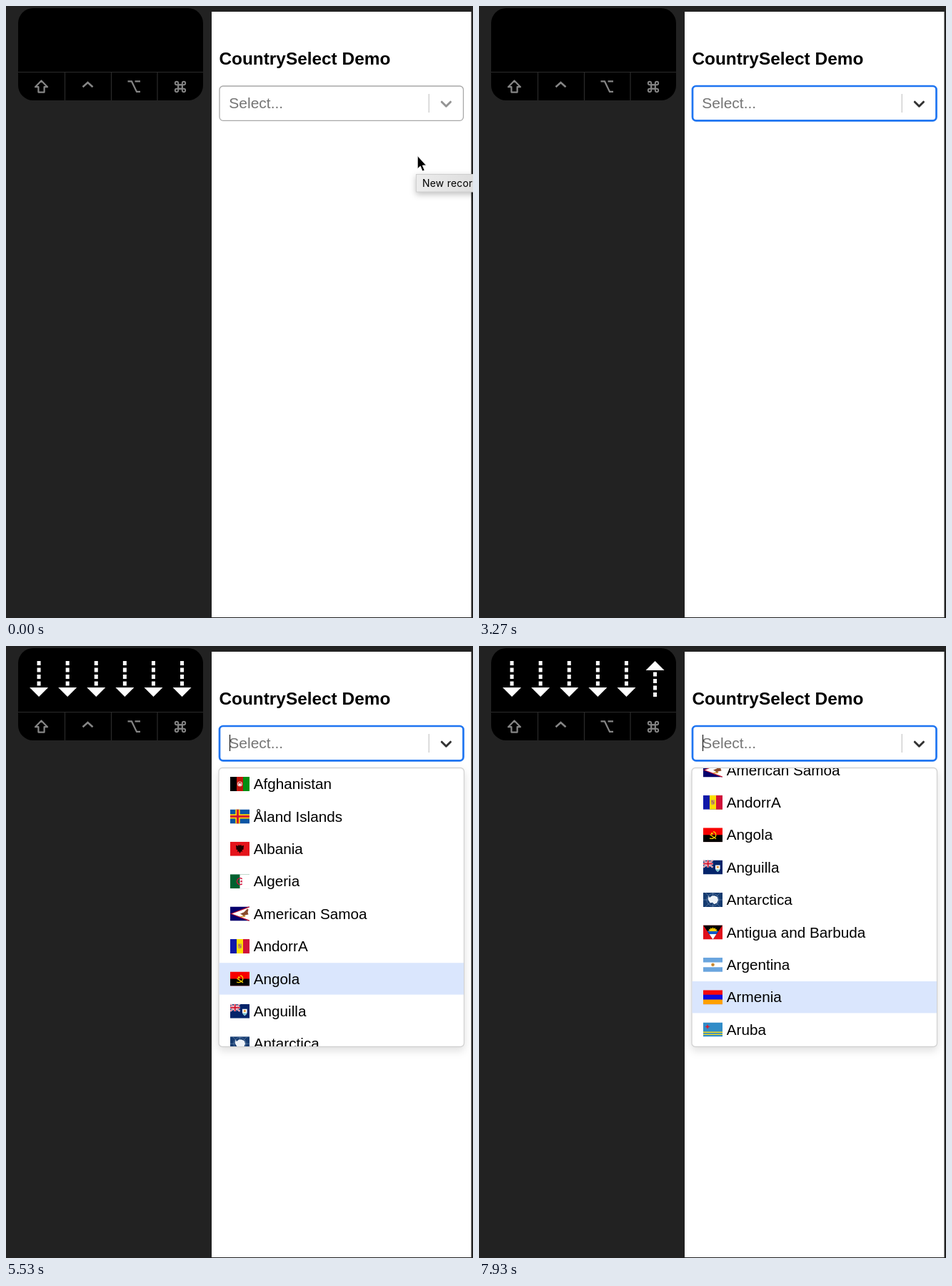
Recreate the animation shown at these times as an HTML page. Size 654 by 856 pixels, loop 8 s.

```html
<!DOCTYPE html>
<html lang="en">
<head>
<meta charset="utf-8">
<title>CountrySelect Demo</title>
<style>
  html, body { margin: 0; width: 100%; height: 100%; overflow: hidden; background: #222; }
  svg { display: block; }
  text { font: 20.7px "Liberation Sans", Arial, sans-serif; white-space: pre; }
  #title { font-size: 24.4px; font-weight: bold; }
  #hint { font-size: 21px; fill: #757575; }
  #tip text { font: 14px Inter, sans-serif; letter-spacing: .2px; }
  #menu > .card { fill: #fff; stroke: #d2d2d2; stroke-width: 1.3; filter: drop-shadow(0 5px 6px rgba(0,0,0,.12)); }
  .icon { fill: none; stroke: #858585; stroke-width: 2.2; }
  .rule { fill: none; stroke: #2b2b2b; stroke-width: 1.2; }
</style>
</head>
<body>
<svg width="654" height="856" viewBox="0 0 654 856">
  <defs>
    <clipPath id="page"><rect x="288" y="8" width="363.5" height="847"/></clipPath>
    <clipPath id="list"><rect x="298.5" y="171" width="342.5" height="389" rx="4.5"/></clipPath>
    <clipPath id="flag"><rect width="27" height="20"/></clipPath>
    <linearGradient id="tipFill"><stop stop-color="#ececec"/><stop offset="1" stop-color="#d9d9d9"/></linearGradient>
    <path id="loop" d="M-2.8 2.8V-5A2.2 2.2 0 1 0-5-2.8H2.8"/>
    <path id="key" fill="#fff" d="M-2.5-25h5v6h-5zM-2.5-15.5h5v6h-5zM-2.5-6h5v6h-5zM-2.5 3.5h5v6h-5zM-13 12h26L0 25z"/>
  </defs>

  <rect width="654" height="856" fill="#222"/>
  <rect x="17" y="3" width="259" height="129" rx="21"/>
  <path class="rule" d="M17 92.5H276M82.5 93V132M147.5 93V132M212 93V132"/>
  <g class="icon">
    <path d="M49.5 104.5L41 113.2H45.4V120.6H53.6V113.2H58Z" stroke-linejoin="round"/>
    <path d="M107.5 113.2L114.5 107L121.5 113.2" stroke-width="2.6"/>
    <path d="M170.5 105.4H176L183 119.9H188M180.5 105.4H188"/>
    <g id="cmd" transform="translate(244 113)" stroke-width="1.9"></g>
  </g>
  <g id="keys"></g>

  <rect x="288" y="8" width="363.5" height="847" fill="#fff"/>
  <text id="title" x="298.4" y="82">CountrySelect Demo</text>
  <rect id="box" x="299" y="112" width="341.5" height="48.3" rx="5" fill="#fff"/>
  <text id="hint" x="312.3" y="143">Select...</text>
  <path id="caret" d="M313.5 124V147" stroke="#222" stroke-width="1.3"/>
  <path d="M592.3 123V149" stroke="#ccc" stroke-width="1.3"/>
  <path id="chevron" d="M610.3 134.2L616.4 140.2L622.5 134.2" fill="none" stroke-width="3" stroke-linecap="round" stroke-linejoin="round"/>

  <g id="menu">
    <rect class="card" x="298" y="170.5" width="343.5" height="390" rx="5"/>
    <g clip-path="url(#list)"><g id="rows">
      <rect id="focus" x="298" width="344" height="44.4" fill="#dae6fd"/>
    </g></g>
  </g>

  <g clip-path="url(#page)"><circle id="touch" r="12.2" fill="#555" fill-opacity=".62"/></g>
  <g id="tip">
    <rect x="574.5" y="235.5" width="110" height="24.5" fill="url(#tipFill)" stroke="#cfcfcf"
      style="filter: drop-shadow(0 3px 4px rgba(0,0,0,.25))"/>
    <text x="583" y="253">New recording</text>
  </g>
  <path id="arrow" d="M576.3 209.5V227.8L580.3 224L583.2 231L586.2 229.8L583.3 223H588.5Z" stroke="#fff" stroke-width=".8"/>
</svg>
<script>
const $ = id => document.getElementById(id);
const show = (id, on) => $(id).style.display = on ? '' : 'none';
const clamp = x => Math.min(1, Math.max(0, x));
const ease = x => x * x * (3 - 2 * x);

// Flag helpers, drawn on a 27 x 20 field
const p = (fill, d) => `<path fill="${fill}" d="${d}"/>`;
const line = (color, w, d) => `<path fill="none" stroke="${color}" stroke-width="${w}" d="${d}"/>`;
const dot = (fill, x, y, r) => `<circle fill="${fill}" cx="${x}" cy="${y}" r="${r}"/>`;
const field = fill => p(fill, 'M0 0H27V20H0Z');
const rowsOf = (...c) => c.map((f, i) => p(f, `M0 ${20 * i / c.length}H27V20H0Z`)).join('');
const colsOf = (...c) => c.map((f, i) => p(f, `M${27 * i / c.length} 0H27V20H0V0Z`.replace('H0V0', `H${27 * i / c.length}`))).join('');

const unionJack = line('#fff', 2.2, 'M0 0L13.5 10M13.5 0L0 10') + line('#d0102c', .8, 'M0 0L13.5 10M13.5 0L0 10')
  + line('#fff', 3.4, 'M6.7 0V10M0 5H13.5') + line('#d0102c', 2, 'M6.7 0V10M0 5H13.5');

const countries = [
  ['Afghanistan', colsOf('#000', '#c0140c', '#008f12') + dot('#e8b5ae', 13.5, 10, 3.6) + dot('#c0140c', 13.5, 9.6, 2)
    + p('#fff', 'M12.2 9h2.6v3h-2.6z')],
  ['Åland Islands', field('#0c55a4') + line('#ffce00', 6.4, 'M10.5 0V20M0 10H27') + line('#d21034', 2.8, 'M10.5 0V20M0 10H27')],
  ['Albania', field('#e5141b') + p('#200', 'M8 5l3 1 1-2 1.5 1.5L15 4l1 2 3-1-.5 6-2.2.5 1 2.5-2.3-.5-1.5 3-1.5-3-2.3.5 1-2.5-2.2-.5z')],
  ['Algeria', colsOf('#00602f', '#fff') + '<path fill="none" stroke="#d2103a" stroke-width="1.5" d="M16.7 6.6A4.4 4.4 0 1 0 16.7 13.4"/>'
    + p('#d2103a', 'M13.5 10l4-1.5-2.5 3.4v-3.8l2.5 3.4z')],
  ['American Samoa', field('#06006c') + p('#c0102c', 'M0 10L27 -.5V20.5Z') + p('#fff', 'M2.5 10L27 1V19Z')
    + p('#8a4a2c', 'M14 10l5-2 5-5 1.5 1-1 4 1 3-5 1-1 3-2-3z') + p('#d9a23c', 'M14 13.5l7-1 .5 1.5-7 1z')],
  ['Andorra'.slice(0, 6) + 'A', colsOf('#1018a8', '#fedf00', '#d0103a') + p('#c7a05a', 'M10.8 6.5h5.4v5.5q-2.7 3-5.4 0z')
    + p('#b4644a', 'M11.8 7.5h1.7v2h1.7v2.2h-1.7v-2.2h-1.7z')],
  ['Angola', rowsOf('#f80000', '#000') + line('#f8d000', 1.3, 'M14 5.5A4.6 4.6 0 0 1 14.5 14.4M9.5 9.5L18 15.5M9 14.6Q12 16 14.5 14.4')
    + dot('#f8d000', 12.2, 8.2, 1.4)],
  ['Anguilla', field('#04246a') + unionJack + p('#fff', 'M17 7h6.6v5q-.6 3-3.3 4.5Q17.6 15 17 12z')
    + p('#6fc0cc', 'M17.3 12.8h6q-.8 2-3 3.2-2.2-1.2-3-3.2z') + p('#e8902c', 'M18.8 8.5h3v2.5h-3z')],
  ['Antarctica', field('#153b70') + line('#6f8db4', .6, 'M13.5 0V20M0 10H27M3 0L24 20M24 0L3 20')
    + '<circle cx="13.5" cy="10" r="8.6" fill="none" stroke="#6f8db4" stroke-width=".6"/>'
    + p('#eef3f8', 'M7.5 4.5l1.5 2.5 3-2.6 4-.2 4 2 1 4-1.6 4-4 2-2.2-2.4-3.2.7-2.2-3-1.2-3z')],
  ['Antigua and Barbuda', field('#e0101c') + p('#000', 'M0 0H27L13.5 20Z') + p('#0f5ac8', 'M5.4 8H21.6L18.5 12.6H8.5Z')
    + p('#fff', 'M8.5 12.6H18.5L13.5 20Z')
    + p('#ffd000', 'M6.8 8.6l2-1.2-1.2-2 2.4.5.3-2.4 1.9 1.6 1.3-2.3 1.3 2.3 1.9-1.6.3 2.4 2.4-.5-1.2 2 2 1.2z')],
  ['Argentina', rowsOf('#6aa5de', '#fff', '#6aa5de') + dot('#d89a3c', 13.5, 10, 2.4) + dot('#b87a30', 13.5, 10, 1.2)],
  ['Armenia', rowsOf('#f80808', '#0c0ce0', '#ffa000')],
  ['Aruba', field('#308cc8') + line('#f8dc1c', 1.4, 'M0 13.6H27M0 16.8H27') + p('#e0182c', 'M6 2.2l1 2.6 2.6 1-2.6 1-1 2.6-1-2.6-2.6-1 2.6-1z')],
];

const TOP = 170.8, PITCH = 45.4, VIEW = 389;
$('rows').insertAdjacentHTML('beforeend', countries.map(([name, flag], i) => {
  const y = TOP + PITCH * i;
  return `<g transform="translate(314 ${y + 12.2})" clip-path="url(#flag)">${flag}</g>
    <text x="346.8" y="${y + 29.4}">${name}</text>`;
}).join(''));
$('cmd').innerHTML = [0, 90, 180, 270].map(a => `<use href="#loop" transform="rotate(${a})"/>`).join('');

const MAX_KEYS = 6, LAG = 60, LOOP = 8000;
const downs = [4070, 4470, 4730, 4960, 5140, 5320, 5500, 5690, 5880, 6130, 6300, 6470, 6640];
const up = 7740, tap = 870;

function drawKeys(t) {
  const n = Math.min(MAX_KEYS, downs.filter(d => t >= d + LAG).length);
  const flipped = t >= up + LAG;
  const state = n + '/' + flipped;
  if (drawKeys.last === state) return;
  drawKeys.last = state;
  $('keys').innerHTML = Array.from({ length: n }, (_, i) => {
    const x = 146.3 + 40.1 * (i - (n - 1) / 2);
    const s = flipped && i === n - 1 ? -1 : 1;
    return `<use href="#key" transform="translate(${x} 46) scale(1 ${s})"/>`;
  }).join('');
}

function drawMenu(t) {
  const last = downs.filter(d => t >= d).length - 1;
  show('menu', last >= 0);
  const picked = Math.max(0, last) - (t >= up ? 1 : 0);
  const scroll = Math.max(0, (last + 1) * PITCH - VIEW);
  $('focus').setAttribute('y', TOP + PITCH * picked);
  $('rows').setAttribute('transform', `translate(0 ${-scroll})`);
}

function drawPointer(t) {
  show('arrow', t < 600);
  show('tip', t < 870);
  $('tip').style.opacity = 1 - clamp((t - 600) / 270);
  show('touch', t >= 600 && t < 2870);
  const a = ease(clamp((t - 600) / 230)), b = ease(clamp((t - 900) / 370)), c = clamp((t - 2600) / 270);
  $('touch').setAttribute('cx', 584 + 32 * a + 21 * b + 28 * c * c);
  $('touch').setAttribute('cy', 206 - 66 * a + 26 * b);
}

function drawBox(t) {
  const on = t >= tap, blink = t % 1000;
  $('box').setAttribute('stroke', on ? '#1f75f1' : '#a8a8a8');
  $('box').setAttribute('stroke-width', on ? 2.7 : 1.3);
  $('chevron').setAttribute('stroke', on ? '#333' : '#949494');
  show('caret', on && (blink >= 530 || blink < 100));
}

const start = performance.now();
function frame(now) {
  const t = Math.max(0, now - start) % LOOP;
  drawKeys(t);
  drawMenu(t);
  drawPointer(t);
  drawBox(t);
  requestAnimationFrame(frame);
}
frame(start);
</script>
</body>
</html>
```
